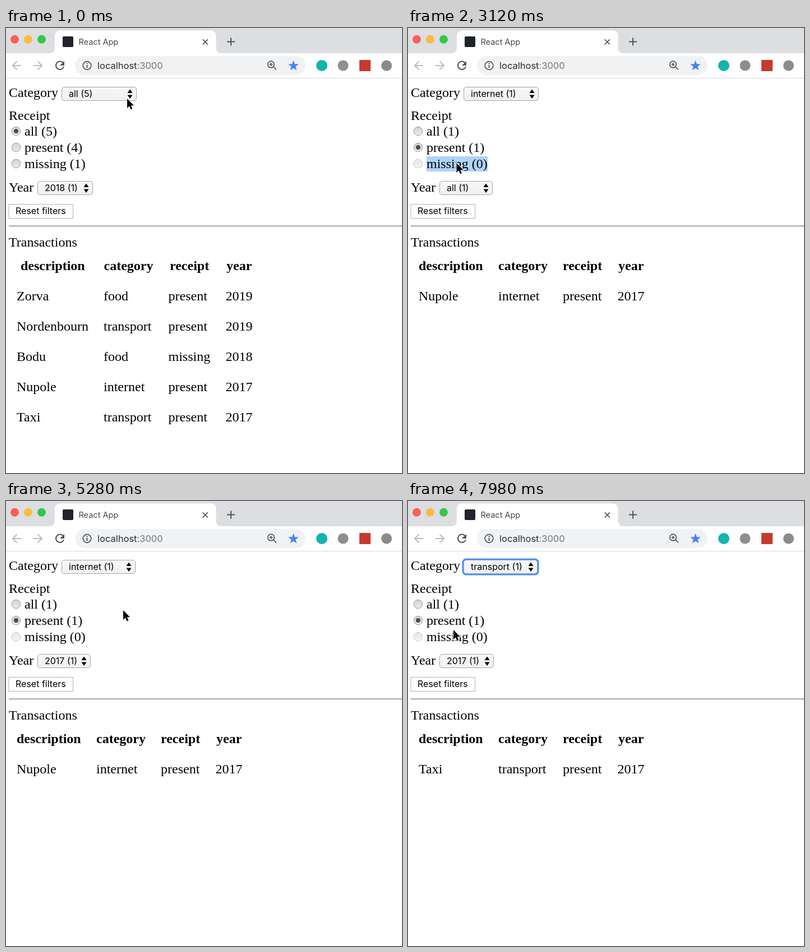
An HTML page for the animation above (8 s loop, 706 by 794 pixels).

```html
<!DOCTYPE html>
<html lang="en">
<head>
<meta charset="utf-8">
<title>Transaction filters</title>
<style>
html, body { margin: 0; width: 100%; height: 100%; overflow: hidden; background: #fff; }
svg { display: block; width: 706px; height: 794px; }
text { font: 24px "Liberation Serif", Times, serif; fill: #000; }
.th { font-weight: bold; }
.ui { font: 16px Inter, Roboto, sans-serif; }
.item { font: 15.4px Inter, Roboto, sans-serif; fill: #393b3f; }
.on { fill: #fff; }
.line { fill: none; stroke: #505357; stroke-width: 2; }
.thin { stroke-width: 1.7; }
.menu { filter: drop-shadow(0 5px 10px rgba(0, 0, 0, .2)); }
</style>
</head>
<body>
<svg viewBox="0 0 706 794">
  <defs>
    <linearGradient id="ctl" x2="0" y2="1"><stop stop-color="#f8f8f8"/><stop offset="1" stop-color="#f0f0f0"/></linearGradient>
    <linearGradient id="dot" x2="0" y2="1"><stop stop-color="#d2d2d2"/><stop offset="1" stop-color="#ececec"/></linearGradient>
    <linearGradient id="pop" x2="0" y2="1"><stop stop-color="#dde0e5"/><stop offset="1" stop-color="#e9ebef"/></linearGradient>
  </defs>
  <rect width="706" height="794" fill="#fff"/>

  <rect width="706" height="45" fill="#dcdee1"/>
  <path d="M77 45q10 0 10-10V14.500q0-10 10-10H364.500q10 0 10 10V35q0 10 10 10z" fill="#fff"/>
  <circle cx="15.5" cy="20.3" r="7.5" fill="#fb5f55"/>
  <circle cx="39.5" cy="20.3" r="7.5" fill="#fcbb3f"/>
  <circle cx="63.5" cy="20.3" r="7.5" fill="#34c749"/>
  <rect x="101" y="15" width="19" height="19" rx="2" fill="#20232a"/>
  <text class="ui" x="129.5" y="30" style="font-size:14.5px;fill:#45484c">React App</text>
  <path class="line thin" d="M350.700 20.300l9 9m0-9l-9 9"/>
  <path class="line" d="M394 24.5h14m-7-7v14"/>

  <path d="M0 89.5H706" stroke="#dadcde"/>
  <path class="line" d="M27 67H12m7.5-7.5L12 67l7.5 7.5M49 67H64m-7.5-7.5L64 67l-7.5 7.5" style="stroke:#babcbf"/>
  <path class="line" d="M101.5 62A7.2 7.2 0 1 0 103 69"/>
  <path d="M104 59v8h-8z" fill="#505357"/>
  <rect x="123" y="50" width="411" height="34" rx="17" fill="#f1f2f3"/>
  <circle class="line thin" cx="144.5" cy="67" r="7.3"/>
  <path class="line" d="M144.5 66v5m0-8.5v2"/>
  <text class="ui" x="163" y="72.5" style="font-size:16.5px;fill:#2b2d30">localhost<tspan fill="#75787c">:3000</tspan></text>
  <circle class="line thin" cx="472.5" cy="65" r="5.8"/>
  <path class="line thin" d="M476.5 69l5.5 5.5M469.5 65h6m-3-3v6"/>
  <path id="star" fill="#4285f4"/>
  <circle cx="563" cy="67" r="10" fill="#12b5ae"/>
  <circle cx="601" cy="67" r="9.5" fill="#8e8e8e"/>
  <rect x="630" y="57" width="20" height="20" fill="#c63a2e"/>
  <circle cx="678.5" cy="67" r="9.5" fill="#8b8b8b"/>

  <text x="5" y="123">Category</text>
  <text x="5" y="163.5">Receipt</text>
  <text x="5" y="291.5">Year</text>
  <rect x="5" y="314.5" width="114.5" height="25" fill="#fff" stroke="#b4b4b4"/>
  <text class="ui" x="17" y="332">Reset filters</text>
  <path d="M5 353H706" stroke="#969696" stroke-width="1.5"/>
  <path d="M5 354.7H706" stroke="#e6e6e6" stroke-width="1.5"/>
  <text x="5" y="389.5">Transactions</text>
  <g id="view"></g>
</svg>
<script>
const LOOP = 8000, STEP = 60, ROW = 21.6;
const view = document.getElementById('view');

// moments of the user's actions
const T = {
  openCat: 480, pickCat: 1380, radio: 2340, mark: 2940, openYear: 3600,
  pickYear: 4620, blur: 5040, reopen: 5880, repick: 7080
};

// pointer stops: time, x, y
const stops = [
  [0, 216, 126], [420, 212, 120], [1020, 196, 141], [1440, 195, 141],
  [2160, 90, 209], [2400, 88, 212], [2760, 86, 239], [3060, 86, 239],
  [3540, 98, 287], [3900, 102, 311], [4680, 102, 310], [5160, 209, 195],
  [5400, 209, 195], [5820, 174, 119], [6360, 171, 138], [6840, 172, 159],
  [7140, 172, 159], [7920, 81, 230], [LOOP, 81, 230]
];

const heads = ['description', 'category', 'receipt', 'year'];
const rows = [
  ['Zorva', 'food', 'present', 2019],
  ['Nordenbourn', 'transport', 'present', 2019],
  ['Bodu', 'food', 'missing', 2018],
  ['Nupole', 'internet', 'present', 2017],
  ['Taxi', 'transport', 'present', 2017]
];

const text = (x, y, s, cls = '') => `<text x="${x}" y="${y}" class="${cls}">${s}</text>`;
const rect = (x, y, w, h, attrs) => `<rect x="${x}" y="${y}" width="${w}" height="${h}" ${attrs}/>`;

function pointer(t) {
  const i = stops.findIndex(s => s[0] > t);
  const [t0, x0, y0] = stops[i - 1], [t1, x1, y1] = stops[i];
  const p = (t - t0) / (t1 - t0), e = p * p * (3 - 2 * p);
  return [x0 + (x1 - x0) * e, y0 + (y1 - y0) * e];
}

function select(x, y, w, label, focused) {
  const a = x + w - 12;
  const ring = focused
    ? rect(x - .5, y - .5, w + 1, 26, 'rx="5" fill="none" stroke="#4b8ff0" stroke-width="4"') : '';
  return ring + rect(x + .5, y + .5, w - 1, 24, `rx="4.5" fill="url(#ctl)" stroke="${focused ? '#7ba9ea' : '#a3a3a3'}"`)
    + text(x + 13, y + 18, label, 'ui')
    + `<path d="M${a - 4.5} ${y + 11}l4.5-6.5 4.5 6.5zm0 3.5l4.5 6.5 4.5-6.5z"/>`;
}

function radio(y, label, checked, off) {
  return `<g opacity="${off ? .5 : 1}"><circle cx="18" cy="${y}" r="7.7" fill="url(#dot)" stroke="#999"/></g>`
    + (checked ? `<circle cx="18" cy="${y}" r="4" fill="#4c4c4c"/>` : '')
    + text(33, y + 8, label);
}

function menu(x, y, w, items, checked, my) {
  const hover = Math.max(0, Math.min(items.length - 1, Math.floor((my - y - 5) / ROW)));
  let out = rect(x, y, w, items.length * ROW + 10, 'rx="6" fill="url(#pop)" stroke="#c3c6cb" stroke-width=".6" class="menu"')
    + rect(x, y + 5 + hover * ROW, w, ROW, 'fill="#438bf6"');
  items.forEach((s, i) => {
    const top = y + 5 + i * ROW, on = i === hover;
    out += text(x + 25.5, top + 16, s, on ? 'item on' : 'item');
    if (i === checked) {
      out += `<path d="M${x + 7.5} ${top + 11.5}l3 4 6-9" fill="none" stroke="${on ? '#fff' : '#393b3f'}" stroke-width="1.8"/>`;
    }
  });
  return out;
}

function table(list, wide) {
  const headX = wide ? [26, 174.5, 292, 393] : [19, 161, 276, 375];
  const cellX = wide ? [19, 174, 289.5, 391.5] : [19, 161, 276, 373.5];
  return heads.map((h, i) => text(headX[i], 431.5, h, 'th')).join('')
    + list.map((r, j) => r.map((c, i) => text(cellX[i], 486 + 54 * j, c)).join('')).join('');
}

function scene(t) {
  const within = (a, b) => t >= a && t < b;
  const [mx, my] = pointer(t);
  const first = t < T.pickCat, last = t >= T.repick, picked = t >= T.pickYear;
  const n = first ? [5, 4, 1] : [1, 1, 0];
  const present = t >= T.radio;
  const catW = picked ? 132 : 134;
  const yearW = first ? 99 : last ? 97 : 95;
  const category = first ? 'all (5)' : last ? 'transport (1)' : 'internet (1)';
  const year = first ? '2018 (1)' : picked ? '2017 (1)' : 'all (1)';

  let out = select(99, 105, catW, category, within(T.openCat, T.radio) || t >= T.reopen)
    + select(56, 273, yearW, year, within(T.openYear, T.blur));
  if (within(T.mark, T.blur)) out += rect(33, 229, 109, 27, 'fill="#b0d2fb"');
  out += radio(184, `all (${n[0]})`, !present)
    + radio(213, `present (${n[1]})`, present)
    + radio(242, `missing (${n[2]})`, false, !first)
    + table(first ? rows : [rows[last ? 4 : 3]], first);

  if (within(T.openCat, T.pickCat)) {
    out += menu(86, 100, 145, ['all (5)', 'internet (1)', 'food (2)', 'transport (2)'], 0, my);
  }
  if (within(T.openYear, T.pickYear)) out += menu(42, 267.7, 109.5, ['all (1)', '2017 (1)'], 0, my);
  if (within(T.reopen, T.repick)) {
    out += menu(86, 78.4, 142.5, ['all (2)', 'internet (1)', 'food (0)', 'transport (1)'], 1, my);
  }
  return out + `<path transform="translate(${mx} ${my})" d="M0 0V17L4 13.3 6.6 19.4 9.4 18.2 6.8 12.2H12Z"
    stroke="#fff" stroke-width="2" paint-order="stroke"/>`;
}

const points = Array.from({ length: 10 }, (_, i) => {
  const a = i * Math.PI / 5, r = i % 2 ? 4 : 10;
  return `${512.5 + r * Math.sin(a)} ${67.5 - r * Math.cos(a)}`;
});
document.getElementById('star').setAttribute('d', `M${points.join('L')}Z`);

let shown = -1;
function draw(now) {
  const t = Math.floor(now % LOOP / STEP) * STEP;
  if (t !== shown) view.innerHTML = scene(shown = t);
  requestAnimationFrame(draw);
}
draw(0);
</script>
</body>
</html>
```
